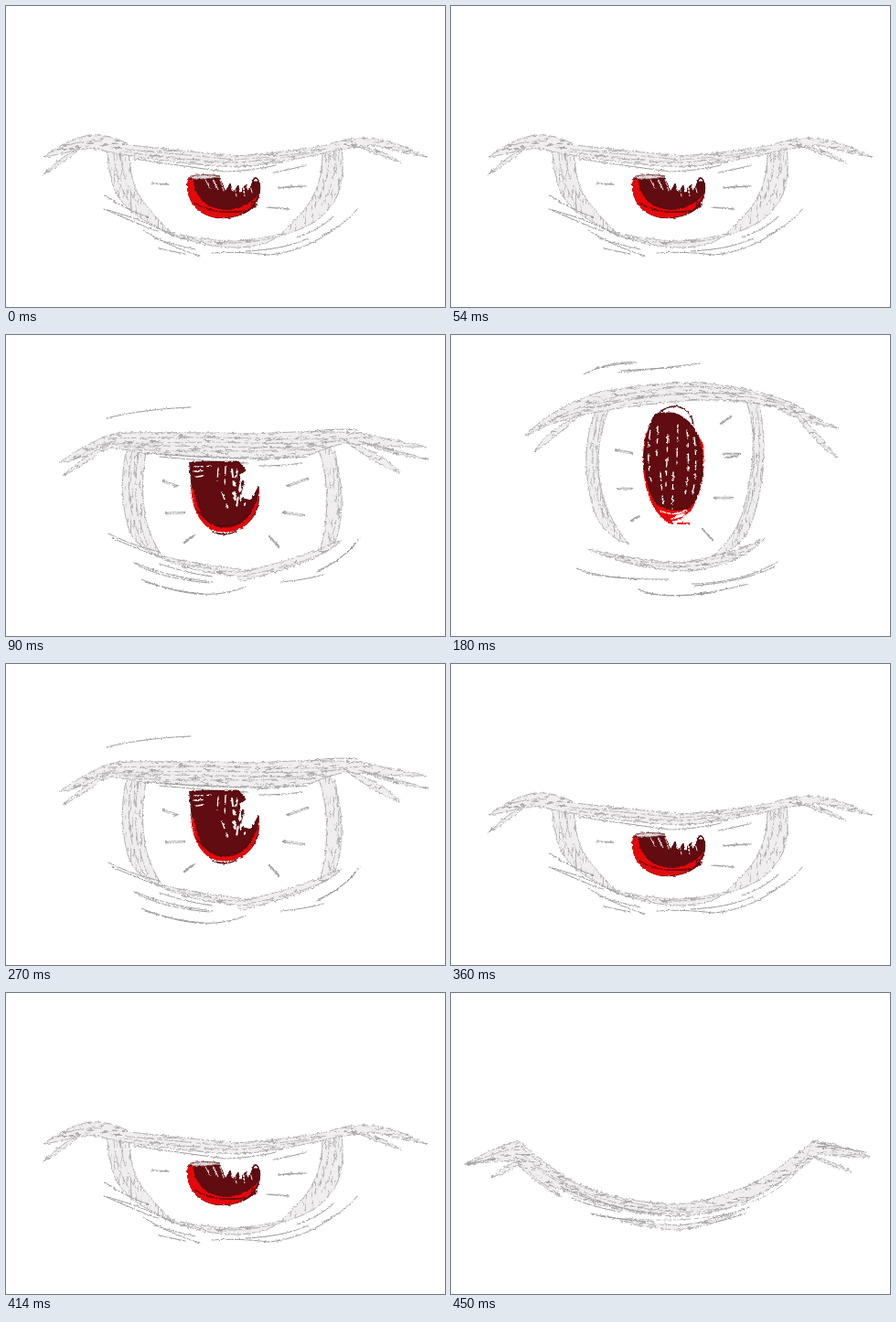
Recreate the animation shown at these times as an HTML page without scripts. Size 480x329 px, loop 540 ms.

```html
<!DOCTYPE html>
<html lang="en">
<head>
<meta charset="utf-8">
<title>Blinking eye</title>
<style>
html, body { margin: 0; width: 100%; height: 100%; overflow: hidden; background: #fff; }
svg { display: block; width: 100vw; height: 100vh; }
path { fill: none; stroke-linecap: round; stroke-linejoin: round; }
.pose { visibility: hidden; animation: .54s step-end infinite; }
#low { animation-name: low; }
#mid { animation-name: mid; }
#wide { animation-name: wide; }
#shut { animation-name: shut; }
@keyframes low { 0%, 66.66% { visibility: visible; } 16.66%, 83.33% { visibility: hidden; } }
@keyframes mid { 0%, 33.33%, 66.66% { visibility: hidden; } 16.66%, 50% { visibility: visible; } }
@keyframes wide { 0%, 50% { visibility: hidden; } 33.33% { visibility: visible; } }
@keyframes shut { 0% { visibility: hidden; } 83.33% { visibility: visible; } }

.lid { filter: url(#across); }
.side { filter: url(#down); }
.lid path, .side path { fill: #f0eeee; stroke: #a5a2a2; stroke-width: .9; stroke-dasharray: 5 1 2 1 7 2 1 2; }
.hatch, .loose { filter: url(#rough); }
.hatch { stroke: #a9a6a6; stroke-width: .8; stroke-dasharray: 9 3 2 2 14 5 4 3; }
.loose { stroke: #999696; stroke-width: 1; stroke-dasharray: 7 1 3 1 11 1; }
.tick { filter: url(#rough); stroke: #a8a5a5; stroke-width: 2.4; }
.core { filter: url(#rough); stroke: #f0eeee; stroke-width: 1.2; }
.iris { filter: url(#rough); }
.iris .dark { fill: #600c10; stroke: #4a080b; stroke-width: 1; }
.iris .rim { fill: #e5080b; }
.iris .red { stroke: #e5080b; stroke-width: 2; }
.iris .ink { stroke: #560a0e; stroke-width: 1.4; }
.iris .gap { stroke: #fff; stroke-width: 1.4; stroke-dasharray: 9 5 4 8; }
.iris .solid { stroke-dasharray: none; }
</style>
</head>
<body>
<svg viewBox="0 0 480 329" preserveAspectRatio="none">
  <defs>
    <filter id="rough" filterUnits="userSpaceOnUse" x="0" y="0" width="480" height="329" color-interpolation-filters="sRGB">
      <feTurbulence type="fractalNoise" baseFrequency=".35" numOctaves="2" seed="4"/>
      <feDisplacementMap in="SourceGraphic" scale="3" xChannelSelector="R" yChannelSelector="G"/>
    </filter>
    <filter id="across" filterUnits="userSpaceOnUse" x="0" y="0" width="480" height="329" color-interpolation-filters="sRGB">
      <feTurbulence type="fractalNoise" baseFrequency=".07 .55" numOctaves="2" seed="7"/>
      <feColorMatrix values="0 0 0 0 .68  0 0 0 0 .67  0 0 0 0 .67  9 0 0 0 -5.3"/>
      <feComposite in2="SourceAlpha" operator="in" result="grain"/>
      <feMerge result="inked"><feMergeNode in="SourceGraphic"/><feMergeNode in="grain"/></feMerge>
      <feTurbulence type="fractalNoise" baseFrequency=".3" numOctaves="2" seed="2" result="noise"/>
      <feDisplacementMap in="inked" in2="noise" scale="4" xChannelSelector="R" yChannelSelector="G"/>
    </filter>
    <filter id="down" filterUnits="userSpaceOnUse" x="0" y="0" width="480" height="329" color-interpolation-filters="sRGB">
      <feTurbulence type="fractalNoise" baseFrequency=".55 .07" numOctaves="2" seed="9"/>
      <feColorMatrix values="0 0 0 0 .72  0 0 0 0 .71  0 0 0 0 .71  9 0 0 0 -5.4"/>
      <feComposite in2="SourceAlpha" operator="in" result="grain"/>
      <feMerge result="inked"><feMergeNode in="SourceGraphic"/><feMergeNode in="grain"/></feMerge>
      <feTurbulence type="fractalNoise" baseFrequency=".3" numOctaves="2" seed="5" result="noise"/>
      <feDisplacementMap in="inked" in2="noise" scale="3" xChannelSelector="R" yChannelSelector="G"/>
    </filter>
  </defs>

  <g id="low" class="pose">
    <g class="side">
      <path d="M111 156C112 188 117 213 146 231Q164 242 184 251Q160 228 148 211C137 195 136 178 134 156Z"/>
      <path d="M367 154C371 194 364 216 340 234Q322 246 298 251Q326 227 335 209C344 193 346 178 346 157Z"/>
    </g>
    <g class="lid">
      <path d="M42 165Q74 140 100 141Q118 142 135 152Q190 158 250 164Q310 160 350 152Q380 142 402 145Q432 150 460 165Q428 158 400 152Q374 155 350 160Q300 172 255 176Q210 174 175 169Q140 165 110 159Q92 153 76 158Q58 162 42 165Z"/>
      <path d="M40 185Q58 166 82 154Q68 168 40 185ZM382 153Q412 156 433 172Q410 163 382 153Z"/>
      <path d="M170 245Q210 256 250 257Q280 255 304 248Q286 262 255 264Q212 264 170 245Z"/>
    </g>
    <path class="hatch" d="M132 157Q190 162 250 168Q310 164 350 156M140 161Q200 169 252 171Q300 168 346 158M56 157Q78 146 104 148M118 160Q119 190 134 212M125 160Q127 190 142 213M360 160Q362 190 345 218M353 162Q354 190 338 218M186 252Q250 266 296 252"/>
    <g class="loose">
      <path d="M108 207Q130 222 156 231M107 222Q150 233 184 252M110 223Q146 239 168 247M150 245Q178 263 212 273M162 254Q188 262 207 266M167 265L196 271"/>
      <path d="M384 222Q370 240 345 251M358 230Q342 245 318 253M355 247Q320 270 286 272Q255 268 225 270M330 254Q305 266 262 268"/>
      <path d="M140 167Q200 176 240 181Q270 180 295 174M292 182Q310 179 328 174"/>
    </g>
    <path class="tick" style="stroke-width:1.6" d="M160 194L178 195M298 199L313 197M308 198L328 197M286 220L309 222"/>
    <g class="iris">
      <path class="dark" d="M200 188L234 188L240 203L245 194L248 204L254 196L256 205L262 195L264 203L270 192L277 192Q280 204 272 218Q262 230 238 232Q218 232 206 219Q195 204 200 188Z"/>
      <path class="rim" d="M199 190Q195 208 208 221Q222 234 242 231Q267 229 276 206Q262 222 242 223Q220 222 211 208Q205 200 205 190Z"/>
      <path class="gap solid" style="stroke-width:.9" d="M218 190L223 199M227 190L232 201M234 190L238 202M250 196L252 208M259 198L261 207M267 196L269 204"/>
      <path class="ink" d="M206 215Q225 229 262 224M273 196a3 4 0 1 1 .1 0M271 220a3 3 0 1 1 .1 0"/>
      <path d="M202 186Q216 183 234 186Q222 190 204 189Z" style="fill:#e2d6d7;stroke:#7a4549"/>
    </g>
  </g>

  <g id="mid" class="pose">
    <g class="side">
      <path d="M132 123C126 152 125 180 134 211Q142 234 172 244Q157 222 152 196C148 170 149 148 154 124Z"/>
      <path d="M340 121C352 150 355 190 344 234L360 226C370 200 371 150 352 119Z"/>
    </g>
    <g class="lid">
      <path d="M58 140Q90 116 122 107Q200 106 275 108Q330 104 385 107Q420 114 460 122Q420 123 372 118Q352 122 335 130Q300 135 255 134Q190 133 150 129Q130 125 116 123Q92 132 58 140Z"/>
      <path d="M62 154Q84 133 114 118Q92 139 62 154ZM372 117Q412 128 431 151Q406 142 372 117ZM392 118Q425 125 461 136Q425 132 392 118Z"/>
      <path d="M250 260Q310 249 367 224Q340 250 256 269Z"/>
      <path d="M162 240Q205 250 256 256L250 263Q198 259 162 240Z"/>
    </g>
    <path class="hatch" d="M112 113Q200 111 275 113T388 112M100 120Q190 116 270 118T370 114M128 121Q200 121 270 123T350 119M140 125Q210 129 335 125M74 136Q98 121 120 116M386 116Q412 124 440 130M138 126C131 160 133 200 152 232M146 126C138 160 140 200 158 236M359 126C367 160 365 200 354 226M176 246Q210 254 248 259M264 262Q320 252 354 235"/>
    <g class="loose">
      <path d="M110 91Q150 81 202 79M338 105Q362 102 386 104M168 133Q220 138 265 140M275 137Q305 134 330 133M277 143Q302 143 324 140M160 129Q230 136 300 135"/>
      <path d="M112 217Q138 230 168 237M116 222L160 240M140 249Q180 265 226 270M144 252Q176 267 222 271M168 250Q196 260 226 264M148 267Q215 295 262 275M152 270Q190 281 216 283"/>
      <path d="M387 222Q368 246 342 257M382 229Q365 247 340 259M347 262Q325 268 300 270"/>
    </g>
    <path class="tick" d="M172 160L187 165M175 195L195 194M195 227L206 219M308 165L330 157M303 194L326 197M288 220L298 231"/>
    <path class="core" d="M174 161L185 164M177 195L193 194M311 164L328 158M306 194L324 197"/>
    <g class="iris">
      <path class="dark" d="M201 139L254 138L262 148L254 154L260 160L256 178L268 181L276 166Q280 195 260 209Q240 220 223 211Q206 199 204 176Z"/>
      <path class="rim" d="M202 166Q204 200 223 212Q240 220 260 210Q278 195 277 166Q275 190 259 205Q240 215 224 207Q209 196 206 170Z"/>
      <path class="gap" style="stroke-width:2" d="M247 146L251 182M253 147L248 174M258 152L252 188M262 158L261 186M256 162L257 184"/>
      <path class="gap" d="M240 144L239 168M206 144L228 143M206 149L219 148M232 146L231 160M208 155L216 154M236 172L243 190"/>
      <path class="ink" d="M254 139L261 148M262 187Q272 177 276 167M208 190Q222 209 240 209Q258 207 266 195M226 215Q240 221 252 214"/>
    </g>
  </g>

  <g id="wide" class="pose">
    <g class="side">
      <path d="M159 82C145 112 145 150 155 188Q164 218 194 229Q176 205 168 183C158 150 158 118 173 80Z"/>
      <path d="M322 70C336 105 330 150 320 190Q311 222 284 243Q308 238 323 218C342 180 348 115 335 70Z"/>
    </g>
    <g class="lid">
      <path d="M80 111Q110 80 160 63Q215 52 270 52Q330 57 375 75Q398 92 424 102Q385 96 355 79Q315 70 270 71Q205 75 150 86Q112 94 80 111Z"/>
      <path d="M91 128Q104 105 142 86Q118 109 91 128ZM370 76Q396 102 423 134Q398 121 370 76Z"/>
      <path d="M150 234Q200 246 250 249Q300 242 343 222Q318 251 262 258Q200 257 150 234Z"/>
    </g>
    <path class="hatch" d="M96 101Q140 72 220 60T365 75M120 91Q170 72 240 65T370 79M156 76Q230 61 320 64M160 90C150 130 154 180 176 214M166 86C154 130 160 180 182 218M335 84C343 130 332 190 308 230M329 84C336 130 328 180 313 218M166 240Q250 261 328 234M190 248Q250 259 310 245"/>
    <g class="loose">
      <path d="M145 43Q174 28 203 30M158 37Q180 31 198 31M183 41Q225 37 272 31M186 39L250 35"/>
      <path d="M137 255Q170 268 237 267M146 260Q175 266 200 266M263 272Q318 271 357 248M266 274Q320 270 354 253M205 278Q240 294 325 272M212 282Q245 288 290 281"/>
    </g>
    <path class="tick" d="M180 126L198 129M183 168L198 168M197 203L206 198M295 97L306 89M298 130L316 130M301 134L313 132M288 178L308 178M275 212L286 224"/>
    <path class="core" d="M183 127L196 129M186 168L196 168M301 131L313 131M291 178L305 178"/>
    <g class="iris">
      <path class="rim" d="M213 106Q205 148 217 178Q225 199 240 206L246 197L262 193Q279 165 276 120L268 105Z"/>
      <path class="dark" d="M223 87Q242 80 260 95Q273 106 275 138Q275 174 262 188Q244 196 225 185Q211 165 211 131Q213 102 223 87Z"/>
      <path class="gap" d="M218 104Q213 135 219 160M226 100L225 132M237 109L235 165M248 98L247 140M258 104Q262 145 255 181M266 112Q270 145 264 174M229 150L232 186M243 150L242 190"/>
      <path class="ink" d="M221 91Q238 73 253 80Q264 86 265 98M228 88Q244 80 258 94"/>
      <path class="red" d="M222 183Q229 200 242 206M234 202Q254 205 264 186M248 206L260 206"/>
      <path class="gap solid" d="M229 192Q242 199 257 192M241 201L256 197"/>
    </g>
  </g>

  <g id="shut" class="pose">
    <g class="lid">
      <path d="M14 188Q40 172 74 161Q105 191 142 210Q190 230 250 231Q305 224 350 197Q374 180 397 161Q430 167 458 179Q430 180 402 176Q370 202 335 222Q298 241 250 244Q190 242 142 225Q122 216 110 209L121 223Q92 209 70 183Q44 184 14 188Z"/>
      <path d="M44 202Q58 188 78 182Q68 194 44 202ZM394 178Q418 184 438 195Q414 190 394 178Z"/>
      <path d="M186 249Q225 253 252 254Q285 248 312 241Q288 254 250 259Q216 258 186 249Z"/>
    </g>
    <path class="hatch" d="M76 168Q150 233 250 235T392 172M80 178Q150 236 250 239T390 180M90 188Q160 242 250 241M26 184Q50 174 74 168M400 168Q430 172 450 178M190 246Q250 252 306 241M84 194Q98 208 114 217"/>
    <g class="loose">
      <path d="M120 212Q170 236 230 242M132 224Q155 234 185 239M154 241Q184 248 222 250M163 244Q190 248 212 250M282 247Q306 242 326 234M290 250Q308 246 323 240M18 187L48 181M400 164Q430 170 454 174"/>
    </g>
  </g>
</svg>
</body>
</html>
```
